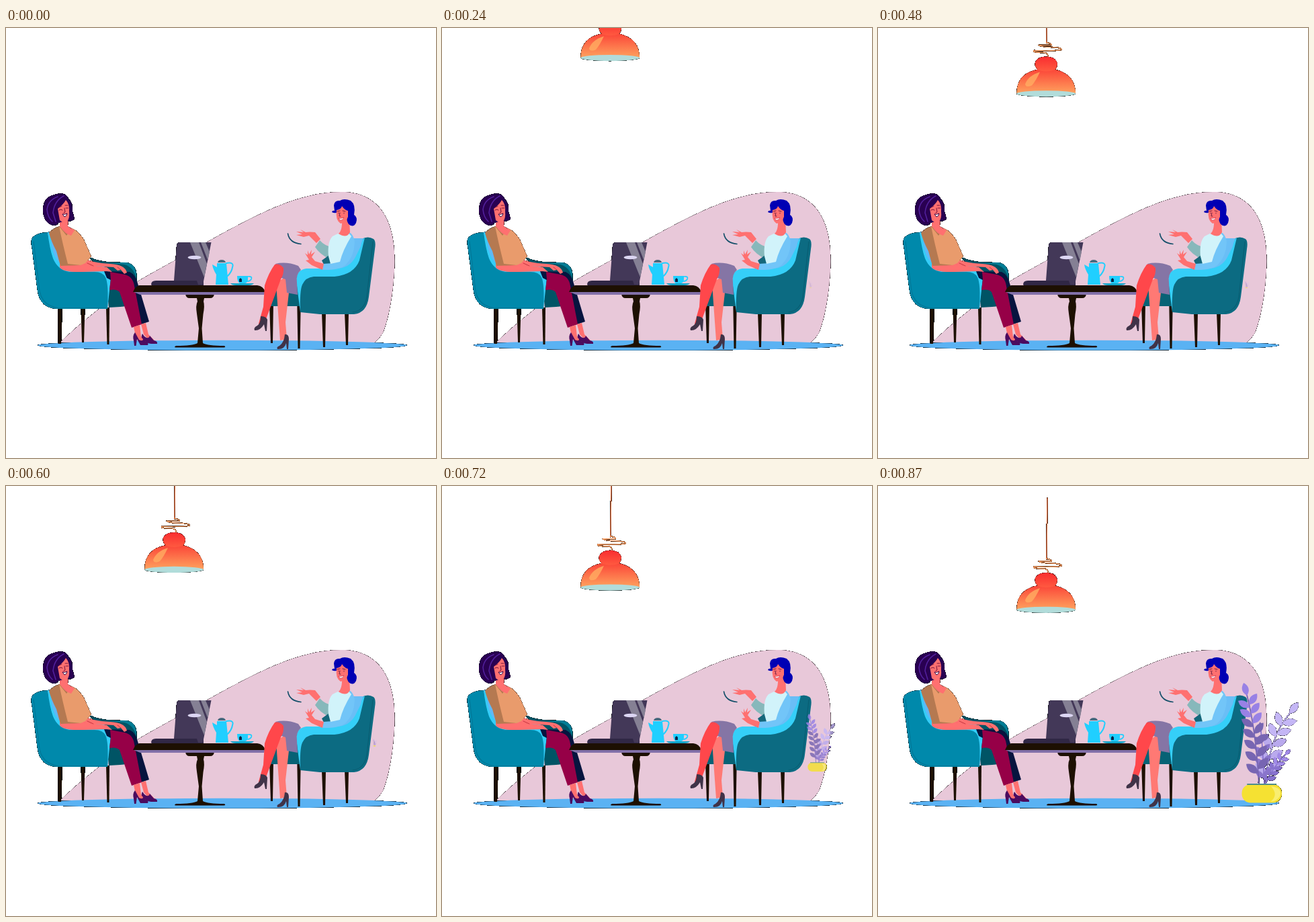
Write an HTML page that moves like this. It is 640 px wide and 640 px high and loops after 1.62 s.

```html
<!DOCTYPE html>
<html lang="en">
<head>
<meta charset="utf-8">
<title>Conversation</title>
<style>
html, body { margin: 0; height: 100%; overflow: hidden; background: #fff; }
svg { display: block; width: 100vw; height: 100vh; }
.line { fill: none; stroke-linecap: round; stroke-linejoin: round; }
.wood { fill: #1d1002; }
.skin { fill: #ff7070; }
</style>
</head>
<body>
<svg viewBox="0 0 640 640">
  <defs>
    <linearGradient id="glow" x1="0" y1="0" x2="0" y2="1">
      <stop offset="0" stop-color="#fb4538"/><stop offset="1" stop-color="#ffa25e"/>
    </linearGradient>
    <linearGradient id="knob" x1="0" y1="0" x2="0" y2="1">
      <stop offset="0" stop-color="#f92d30"/><stop offset="1" stop-color="#ff5a40"/>
    </linearGradient>
    <!-- half-covered pixels along the outer silhouette turn dark -->
    <filter id="fringe" filterUnits="userSpaceOnUse" x="0" y="0" width="640" height="640" color-interpolation-filters="sRGB">
      <feComponentTransfer in="SourceAlpha">
        <feFuncA type="discrete" tableValues="0 1 1 1 1"/>
      </feComponentTransfer>
      <feMerge result="dark"><feMergeNode/><feMergeNode in="SourceGraphic"/></feMerge>
    </filter>
  </defs>

  <g filter="url(#fringe)">
  <path fill="#e8c8d9" d="M80 468C112 438 150 407 194 378C230 357 265 339 300 318C334 299 367 281 400 267C438 251 470 243 505 244C557 247 579 288 578.500 348C578 385 571 430 561 454Q556 462 549 468Z"/>
  <ellipse cx="322" cy="472.300" rx="275" ry="7.500" fill="#5ab2f3"/>

  <!-- left chair -->
  <g class="wood">
    <path d="M77 417H84L82 470H77.500Z"/>
    <path d="M111.500 417H117.500L116 468H113Z"/>
    <path d="M149 416H154L153.500 471H150.500Z"/>
  </g>
  <path fill="#005465" d="M122 340Q138 348 158 348.500L178 349Q195 351 194.500 370V396Q192 414 170 415L153 416L148 365Z"/>
  <path fill="#007d95" d="M150 349H180Q195 352 194 372Q189 355 176 352Z"/>
  <path fill="#0089ab" d="M63 304Q48 304 40 311Q36 315 38.500 327L47 392Q51 417 76 418H151L155 370Q152 357 140 356L90 355L76 340Z"/>
  <path class="line" stroke="#007898" stroke-width="1.200" d="M41 318L50 392Q55 414 78 416.500H150"/>
  <path fill="#5fb8f6" d="M62 304L72 302L88 346L100 358L84 358Q70 349 67 330Z"/>
  <path fill="#35cdf8" d="M62 304Q66 304 67 316Q69 343 85 354L141 354Q157 356 156 372L151 418Q153 380 148 371Q144 363 132 363L94 363Q77 360 70 343Q65 329 62 304Z"/>

  <!-- left woman -->
  <path fill="#07143f" d="M146 362L184 363Q193 367 196 380L213 437L201 441L175 385L150 372Z"/>
  <path fill="#960047" d="M155 363L177 367Q189 370 191 384L202 441L187 446L169 393Q165 388 154 390L156 374Z"/>
  <path class="skin" d="M190 445L199 442L201 459L210 468L204 470L193 459ZM201 441L208 439L212 456L221 465L215 467L205 456Z"/>
  <path fill="#4b0c5f" d="M192 453Q188 458 190 465L191 473H193.500L195 463L200 472H211Q213 468 208 467L204 463Q204 467 198 464ZM203 455Q200 460 204 463Q210 470 216 470H225Q226 466 220 465L214 458Q212 464 206 459Z"/>
  <path class="skin" d="M112 341Q128 350 155 351Q177 352 180 364L176 366L171 360L166 361L160 356L128 354L110 352Z"/>
  <path class="skin" d="M80 347L116 352L150 356L158 363L150 362L114 363Q84 364 80 356Z"/>
  <path fill="#b57951" d="M82 294Q68 299 64 305Q67 317 75 332L81 354L112 353L105 306L90 304Z"/>
  <path fill="#e99b6c" d="M79 295L90 309L98 298Q108 302 116 315L127 340L118 350L111 353L92 351Q84 320 79 295Z"/>
  <path class="skin" d="M80 284H93L92 295L102 301L97 309Q88 307 80 295Z"/>
  <path fill="#290052" d="M76 247Q89 244 93 254Q100 260 99 273L102 284Q97 289 91 287L78 290Q77 294 70 294Q56 290 55 272Q55 253 69 249Z"/>
  <path class="line" stroke="#51209b" stroke-width="1.600" d="M77 251Q63 256 61 270Q62 282 69 288M86 250Q72 257 70 275L74 288"/>
  <path class="skin" d="M77 269Q86 262 89 256Q95 262 94 273Q95 283 91 288Q86 292 80 286Z"/>
  <path class="line" stroke="#74143c" stroke-width="1" d="M79 267L83 265M88 264L92 264M79 271Q82 269 84 271M89 268L93 268M87 268L88 274L86 275"/>
  <path fill="#fff" stroke="#360040" stroke-width="1" d="M84 277Q88 278 91 276Q90 281 87 281Z"/>
  <path class="line" stroke="#bd303d" stroke-width=".9" d="M121 350L130 354M166 356L171 360"/>

  <!-- table -->
  <g class="wood">
    <path d="M267 396H310Q309 402 304 402H273Q268 402 267 396Z"/>
    <path d="M284 402H295L294 407Q296 413 293.500 426L291.500 447L293 469Q300 473 325 473Q328 475 324 475.500H253Q249 475 253 473Q278 473 285 469L287 447L284 425Q282 413 285 407Z"/>
    <path d="M198 383H374Q383 384 386 393H189Q192 385 198 383Z"/>
  </g>
  <path fill="#8270a9" d="M190 393H386L384 397H200Z"/>
  <path fill="#302745" d="M216 382Q216 376 223 376H294V383H217Z"/>
  <path fill="#433858" d="M254 323Q254 319 259 319H305.500L293 382H286L284 376H250Z"/>
  <path fill="#858094" d="M274 319H287L299 351L295 371ZM290 319H297L303 333L300.500 346Z"/>
  <ellipse cx="280.500" cy="341.500" rx="10" ry="2.800" fill="#dcd6f3"/>

  <!-- tea -->
  <path fill="#20cfff" d="M314 350H328L331 382H312L313 367Q308 359 307 352L314 356Z"/>
  <path class="line" stroke="#20cfff" stroke-width="2" d="M328 350Q340 348 337 356Q336 363 330 369"/>
  <path fill="#48697d" d="M315 349Q316 345 321 345Q326 345 327 349Z"/>
  <path fill="#20cfff" d="M344 369H360V375Q359 380 355 380H348Q344 378 344 369Z"/>
  <path class="line" stroke="#20cfff" stroke-width="1.700" d="M360 370Q367 369 365 374Q363 377 359 377"/>
  <path fill="#07264a" d="M347 374L349 372L351 374V378H347Z"/>
  <path fill="#13a5c9" d="M334 380H369Q367 383 360 383H343Q336 383 334 380Z"/>

  <!-- right chair -->
  <path class="wood" d="M392 410H398L397 469H394ZM433 395H439L437.500 477H434.500ZM470 423H476L475 475H472ZM504 423H510L509 472H506Z"/>
  <path fill="#076275" d="M387 386Q390 378 402 378L435 382L437 414H394Q391 400 387 386Z"/>
  <path fill="#0c6b82" d="M529 314Q539 309 547 314Q551 317 549 329L540 400Q537 424 518 426H467L438 423L436 379L454 369L492 367L517 345Z"/>
  <path class="line" stroke="#085d72" stroke-width="1.200" d="M546 318L537 401Q533 421 516 423"/>
  <path fill="#6abef6" d="M517 313L532 313L526 343Q519 361 499 362L490 355Z"/>
  <path fill="#35cff8" d="M534 312Q530 314 528 325L520 341Q511 358 491 358H447Q432 360 432 376L438 423Q437 391 441 382Q446 371 458 370H489Q518 367 526 346Z"/>

  <g id="plant">
    <g id="leaves"></g>
    <rect x="541.500" y="444" width="59.500" height="27.500" rx="13" fill="#f5e132"/>
    <path fill="#f9ee70" d="M585 447Q603 449 598 462Q594 469 584 470Q597 460 585 447Z"/>
    <path class="line" stroke="#4f8f8a" stroke-width="2" d="M550 444H592"/>
  </g>

  <!-- right woman -->
  <path fill="#ff7974" d="M402 379L417 370L421 394L416 438L418 463L408 465L404 409Z"/>
  <path fill="#8575a5" d="M401 351Q417 347 435 354L439 360Q431 367 433 379L434 397L418 394L416 374L407 371Z"/>
  <path fill="#ff474b" d="M400 352Q407 350 413 357Q414 366 409 374L386 436L378 446L376 440L383 415L385 383Q391 364 400 352Z"/>
  <path fill="#403348" d="M379 429Q387 429 389 434L388 451H386L384 441Q378 451 370 450Q368 446 374 443Q379 440 379 429Z"/>
  <path fill="#403348" d="M415 456Q421 455 421 463L420 478H418L417 469Q414 479 404 478Q402 475 407 473Q414 468 415 456Z"/>
  <path class="skin" d="M468 314L460 304Q452 303 446 304L438 300L443 304L432 303L441 307L432 308L443 311L451 309L462 320Z"/>
  <path fill="#87b8bb" d="M467 316Q474 324 485 326L482 344Q467 337 460 326Z"/>
  <path fill="#15677b" d="M481 338L470 346L474 354L487 356Z"/>
  <path fill="#72c5f8" d="M509 303Q518 307 519 319Q518 339 507 351Q499 361 471 360L472 351L486 350Z"/>
  <path fill="#d1f3fa" d="M494 306L486 310Q478 318 480 340L483 351L497 348Q501 331 514 310L509 304Q503 313 494 306Z"/>
  <path class="skin" d="M473 351L460 347L455 341L460 333L454 337L455 330L451 337L449 331L449 338L445 335L451 345L446 346L455 353L471 360Z"/>
  <path class="skin" d="M500 283H511L512 304Q507 314 495 306Q501 301 500 283Z"/>
  <path fill="#0000b4" d="M488 264Q489 256 497 257Q503 253 513 257Q521 263 518 278Q524 282 521 290Q517 298 510 292Q506 286 508 279L500 270Q492 278 485 274Q486 271 489 272Z"/>
  <path class="skin" d="M492 271Q499 270 500 265Q504 271 509 272V281Q506 290 498 291Q490 286 492 271Z"/>
  <path class="line" stroke="#712244" stroke-width="1" d="M493 273L497 272M501 272L505 273M495 275V276M503 275V276M497 275L496 280H498"/>
  <path fill="#fff" stroke="#c92b47" stroke-width=".7" d="M495 283Q499 284 503 282Q501 287 497 286Z"/>
  <path class="line" stroke="#15506a" stroke-width="1.600" d="M419.500 306Q422 320 439 321.500"/>

  <g id="lamp">
    <g class="line" stroke="#f58050" stroke-width="1.400">
      <path d="M252 18L250.800 109"/>
      <path stroke="#ffa063" d="M250.500 108Q260 110 258 112L239 112Q243 115 259 115Q275 116 273 119Q263 121 232 120Q229 123 246 123Q254 123 253 130"/>
    </g>
    <path fill="url(#glow)" d="M206.300 184Q206 154 238 148H263Q294 155 294.200 184Z"/>
    <path fill="url(#knob)" d="M238 149Q232 143 234 137Q238 129 250 129Q264 129 267 139Q267 146 263 149Q250 153 238 149Z"/>
    <path fill="#ffac62" opacity=".8" d="M241 152Q224 157 219 170Q220 176 229 172Q235 165 241 152Z"/>
    <ellipse cx="250.200" cy="184.300" rx="44" ry="4.600" fill="#b1dcda"/>
  </g>
  </g>
</svg>
<script>
const LOOP = 1620, MOVE = 870, STEP = 30;
const $ = id => document.getElementById(id);
const lamp = $('lamp'), plant = $('plant');

// A curved stem with leaf pairs that shrink towards the tip.
function branch([x0, y0], [cx, cy], [x1, y1], pairs, size, low, high) {
  const mix = (a, b, c, u) => (1 - u) ** 2 * a + 2 * u * (1 - u) * b + u * u * c;
  const at = u => [mix(x0, cx, x1, u), mix(y0, cy, y1, u)];
  const leaf = (u, turn) => {
    const [x, y] = at(u), [nx, ny] = at(u + .01);
    const angle = Math.atan2(ny - y, nx - x) * 180 / Math.PI + turn;
    const k = size * (1 - .15 * u), w = k * .5;
    return `<path d="M0 0Q${k * .5} ${-w} ${k} 0Q${k * .5} ${w} 0 0Z"
      transform="translate(${x} ${y}) rotate(${angle})" fill="${u > .58 ? high : low}"/>`;
  };
  let out = `<path class="line" stroke="${low}" stroke-width="1.8"
    d="M${x0} ${y0}Q${cx} ${cy} ${x1} ${y1}"/>`;
  for (let i = 0; i < pairs; i++) {
    const u = .1 + .84 * i / pairs;
    out += leaf(u, -48) + leaf(u + .04, 48);
  }
  return out + leaf(.99, 0);
}

$('leaves').innerHTML =
  branch([577, 444], [581, 377], [613, 338], 5, 25, '#b9a9ed', '#c4b6f5') +
  branch([576, 444], [588, 418], [606, 400], 5, 14, '#8873cf', '#a18ae8') +
  branch([575, 444], [573, 395], [570, 365], 4, 17, '#8a75cc', '#7765b2') +
  branch([567, 444], [562, 360], [549, 311], 7, 23, '#7765b2', '#9881e5');

function draw() {
  const now = performance.now() % LOOP;
  const t = Math.min(MOVE, Math.floor(now / STEP) * STEP);
  const left = MOVE - t;
  const scale = Math.max(.06, 1 - left * .00347);
  lamp.setAttribute('transform', `translate(0 ${-left * .2218})`);
  plant.setAttribute('transform', `translate(547 382) scale(${scale}) translate(-547 -382)`);
  plant.setAttribute('opacity', t / MOVE);
  requestAnimationFrame(draw);
}
draw();
</script>
</body>
</html>
```
